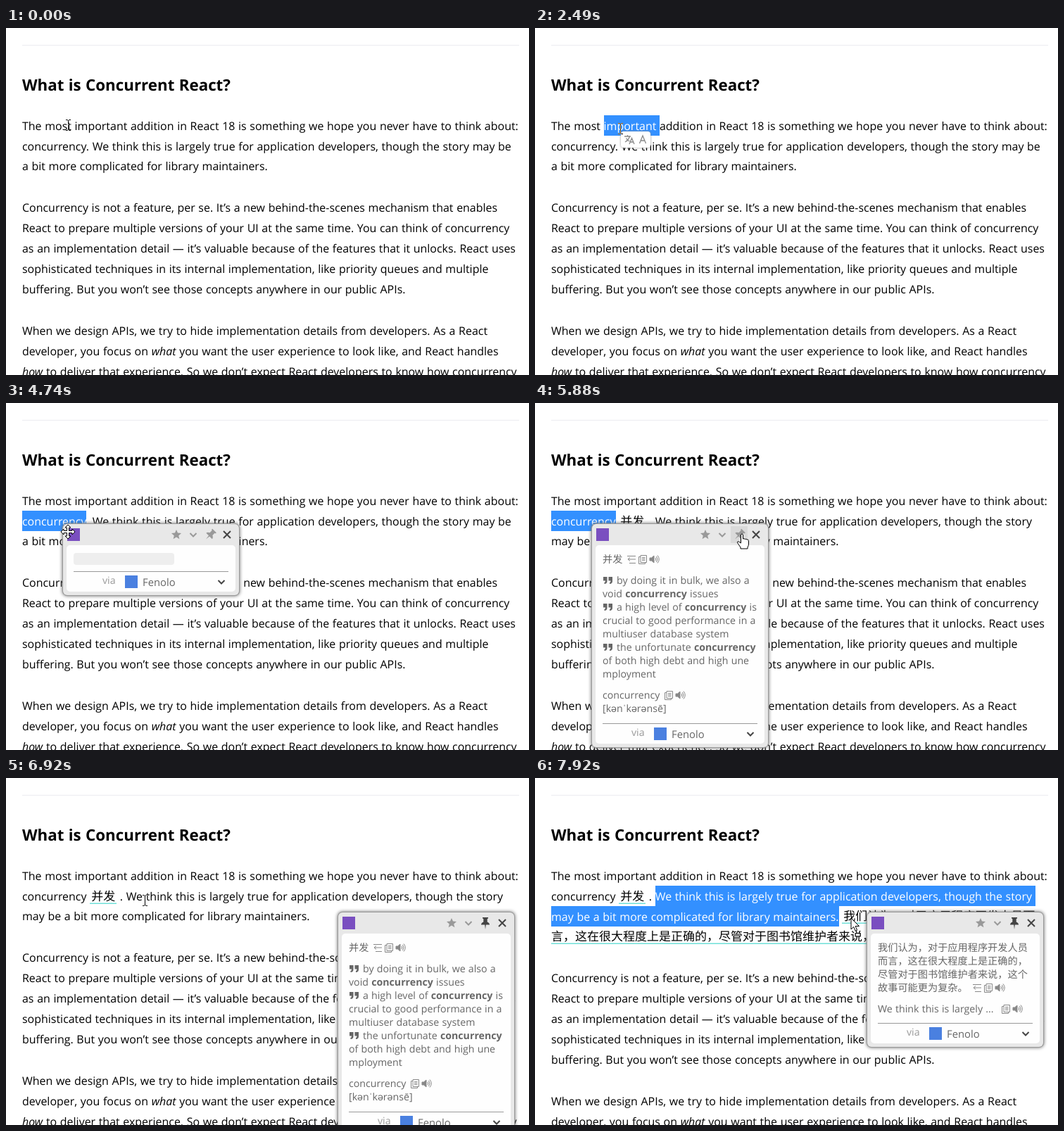
An HTML page that plays this animation: 743 by 493 pixels, repeating every 8 s.

```html
<!DOCTYPE html>
<html lang="en">
<head>
<meta charset="utf-8">
<title>Selection translator</title>
<style>
  html, body { margin: 0; width: 100%; height: 100%; overflow: hidden; background: #fff; }
  #stage {
    position: relative; width: 743px; height: 493px; overflow: hidden; isolation: isolate;
    background: #fff; color: #000; text-rendering: geometricPrecision;
    font: 15.96px/28.9px "Open Sans", "Noto Sans CJK SC", "Noto Sans CJK", sans-serif;
    word-spacing: .5px;
  }
  #stage > * { position: absolute; }
  hr { margin: 0; border: 0; height: 1px; }
  #rule { left: 23px; top: 24px; width: 706px; background: #ebecf0; }
  h2 { left: 23px; top: 66px; margin: 0; font-size: 22.35px; line-height: 30px; font-weight: 700; }
  #article { left: 23px; top: 124.65px; }
  p { margin: 0 0 29.95px; white-space: pre; }
  mark { background: #3390ff; color: #fff; padding: 3.65px 0 3.35px; }
  ins { text-decoration: none; font-size: 17px; line-height: 0; padding: 0 2px; box-shadow: inset 0 -1.6px #6fe0d8; }
  svg { fill: none; stroke: #888; overflow: visible; }
  .solid { fill: currentColor; stroke: none; }
  .filled { fill: #888; }

  #bar { width: 42px; height: 23px; border-radius: 4px; background: #fff; box-shadow: 0 0 3px #888; }
  #bar svg { position: absolute; top: 4px; stroke-width: 1.3; }

  #popup {
    width: 250px; box-sizing: border-box; padding: 30px 5px 5px; border-radius: 6px;
    background: #e8e8e8; box-shadow: 0 0 0 1px #999, 0 0 5px 1px #666;
    color: #666; font-size: 14.2px; line-height: 19.1px;
  }
  #popup .tool { position: absolute; top: 3px; width: 24px; height: 24px; display: grid; place-items: center; color: #999; }
  #popup .tool svg { stroke: currentColor; stroke-width: 2; }
  #popup .tool .solid { stroke: none; }
  .tool.hover { background: #dadada; }
  #popup .dark { color: #444; }
  .tilt { transform: rotate(45deg); }
  .badge { position: absolute; width: 18px; height: 18px; }
  .panel { padding: 10.5px 10px 0; border-radius: 5px; background: #fefefe; }
  .block { white-space: pre; margin-bottom: 11px; }
  .block svg { vertical-align: -2px; margin-right: 2px; }
  .block .solid { margin: 0 6px 0 1px; vertical-align: -1px; }
  .icons { margin-left: 6px; }
  .skeleton { width: 143px; height: 17px; margin-bottom: 10.5px; border-radius: 4px; background: #eee; }
  .panel hr { margin-top: -1px; background: #999; }
  .via { position: relative; height: 28px; line-height: 28px; }
  .via > * { position: absolute; }
  #cursor { left: 0; top: 0; }
</style>
</head>
<body>
<div id="stage">
  <hr id="rule">
  <h2>What is Concurrent React?</h2>
  <div id="article">
    <p id="intro"></p>
    <p>Concurrency is not a feature, per se. It’s a new behind-the-scenes mechanism that enables
React to prepare multiple versions of your UI at the same time. You can think of concurrency
as an implementation detail — it’s valuable because of the features that it unlocks. React uses
sophisticated techniques in its internal implementation, like priority queues and multiple
buffering. But you won’t see those concepts anywhere in our public APIs.</p>
    <p>When we design APIs, we try to hide implementation details from developers. As a React
developer, you focus on <em>what</em> you want the user experience to look like, and React handles
<em>how</em> to deliver that experience. So we don’t expect React developers to know how concurrency</p>
  </div>
  <div id="bar"></div>
  <div id="popup"></div>
  <svg id="cursor" width="743" height="493"><path/></svg>
</div>
<script>
const LOOP = 8000;
const $ = id => document.getElementById(id);
const icon = (d, cls = '', w = 14, h = 14) =>
  `<svg class="${cls}" width="${w}" height="${h}" viewBox="0 0 ${w} ${h}"><path d="${d}"/></svg>`;

const chevron = icon('M2.5 5L7 9.5L11.5 5');
const star = icon('M7 0L9 4.6L14 5L10.2 8.4L11.4 13.3L7 10.6L2.6 13.3L3.8 8.4L0 5L5 4.6Z', 'solid');
const cross = icon('M2 2L12 12M12 2L2 12');
const pin = cls => icon('M3 0H11V1.5L9.7 2V6.5Q13 8 13 10.5H1Q1 8 4.3 6.5V2L3 1.5ZM6.2 10.5H7.8L7 17Z', 'solid ' + cls, 14, 17);
const quote = icon('M0 1H5.5V7Q5.5 11 1.5 11V9Q3 9 3 6.5H0ZM7.5 1H13V7Q13 11 9 11V9Q10.5 9 10.5 6.5H7.5Z', 'solid', 13, 12);
const insert = icon('M1 2.5H13M2 7H13M4 12.5H13M5 4.5L2 7L5 9.5');
const copy = icon('M4 1.5H12.5V11.5H4ZM4 3.5H1.5V13.5H10.5V11.5M6 4.5H10.5M6 6.5H10.5M6 8.5H10.5');
const speaker = icon('M1 5H3.5L7 2V12L3.5 9H1Z', 'filled', 8) +
  icon('M1 5Q2.5 7 1 9M2.5 3Q5.5 7 2.5 11M4 1.5Q8.5 7 4 12.5', '', 7);
const icons = (...list) => `<span class="icons">${list.join('')}</span>`;

$('bar').innerHTML =
  icon('M0 3H9M4.5 1V3M7.5 3Q6 8 1 11M2.5 5.5Q4.5 9 7.5 10M7 14L10.5 5.5L14 14M8.3 11H12.7').replace('<svg', '<svg style="left:5px"') +
  icon('M0.5 13L5 2L9.5 13M2.2 9H7.8', '', 10).replace('<svg', '<svg style="left:26px"');

const cursors = {
  beam: 'M-3 -7.5H-1L.5 -6.5L2 -7.5H4M.5 -6.5V6.5M-3 7.5H-1L.5 6.5L2 7.5H4',
  arrow: 'M0 0V16L3.7 12.5L6.2 18.3L8.6 17.2L6.2 11.5H11.5Z',
  hand: 'M-1.5 1Q0 -1 1.5 1V7Q3 6 4.5 7.5Q6 6.7 7 8Q9 7.5 9.5 9.5V14Q9.5 17 8 19V21H-2V19L-6.5 12.5Q-7 10.5 -4.5 11L-1.5 13Z',
  move: 'M0 -10L4 -6H1.5V-1.5H6V-4L10 0L6 4V1.5H1.5V6H4L0 10L-4 6H-1.5V1.5H-6V4L-10 0L-6 -4V-1.5H-1.5V-6H-4Z'
};

const opening = 'The most important addition in React 18 is something we hope you never have to think about:\n';
const sentence = 'We think this is largely true for application developers, though the story \nmay be a bit more complicated for library maintainers.';
const plain = opening + 'concurrency. We think this is largely true for application developers, though the story may be\na bit more complicated for library maintainers.';
const withWord = opening + 'concurrency <ins>并发</ins> . ' + sentence;
const withSentence = withWord + ' <ins>我们认为，对于应用程序开发人员而\n言，这在很大程度上是正确的，尽管对于图书馆维护者来说，这个故事可能更为复杂。</ins>';
const upTo = word => sentence.slice(0, sentence.indexOf(word) + word.length);

const block = html => `<div class="block">${html}</div>`;
const contents = {
  wait: '<div class="skeleton"></div>',
  word: block('并发' + icons(insert, copy, speaker.replace('<svg', '<svg style="margin:0"'))) +
    block(`${quote}by doing it in bulk, we also a
void <b>concurrency</b> issues
${quote}a high level of <b>concurrency</b> is
crucial to good performance in a
multiuser database system
${quote}the unfortunate <b>concurrency</b>
of both high debt and high une
mployment`) +
    block('concurrency' + icons(copy, speaker.replace('<svg', '<svg style="margin:0"')) + '\n[kənˈkərənsē]'),
  sentence: block('我们认为，对于应用程序开发人员\n而言，这在很大程度上是正确的，\n尽管对于图书馆维护者来说，这个\n故事可能更为复杂。' +
      icons(insert, copy, speaker.replace('<svg', '<svg style="margin:0"'))) +
    block('We think this is largely ... ' + icons(copy, speaker.replace('<svg', '<svg style="margin:0"')))
};

const tool = (x, html, cls = '') => `<span class="tool ${cls}" style="left:${x - 12}px">${html}</span>`;
const popupHtml = ({ popup, pinned, hover }) => `
  <span class="badge" style="left:6px;top:6px;background:#7a4fc0"></span>
  ${tool(161, star)}${tool(185, chevron)}
  ${tool(209, pin(pinned ? '' : 'tilt'), (pinned ? 'dark ' : '') + (hover ? 'hover' : ''))}
  ${tool(233, cross, 'dark')}
  <div class="panel">${contents[popup]}<hr>
    <div class="via">
      <span style="left:41px;top:-1px;color:#999">via</span>
      <span class="badge" style="left:73px;top:5px;background:#4a80e0"></span>
      <span style="left:98px;top:1px;font-size:14.8px">Fenolo</span>
      <span class="tool dark" style="left:198px;top:2px">${chevron}</span>
    </div>
  </div>`;

// time, pointer shape, x, y, changes that persist
const steps = [
  [0, 'beam', 88, 138, { text: plain, selected: '', bar: false, popup: '', pinned: false, hover: false }],
  [400, 'beam', 84, 138],
  [550, 'beam', 79, 139],
  [670, 'beam', 75, 140],
  [930, 'beam', 75, 140, { selected: 'most ' }],
  [1050, 'beam', 75, 140, { bar: true }],
  [1830, 'beam', 75, 140, { bar: false }],
  [2080, 'beam', 93, 141],
  [2230, 'beam', 120, 143, { selected: '' }],
  [2490, 'beam', 121, 143, { selected: 'important ', bar: true }],
  [3250, 'beam', 120, 143, { bar: false }],
  [3380, 'beam', 118, 144],
  [3530, 'beam', 111, 149],
  [3680, 'beam', 98, 158],
  [3800, 'beam', 88, 164],
  [3930, 'beam', 80, 168, { selected: '' }],
  [4050, 'beam', 80, 168, { selected: 'concurrency' }],
  [4180, 'beam', 80, 168, { bar: true }],
  [4330, 'hand', 85, 177, { bar: [81, 172] }],
  [4450, 'hand', 88, 184],
  [4740, 'move', 88, 183, { bar: false, popup: 'wait' }],
  [4860, 'move', 88, 183, { popup: 'word', text: withWord }],
  [5260, 'move', 104, 185],
  [5380, 'move', 180, 187],
  [5500, 'hand', 263, 185],
  [5640, 'hand', 280, 187],
  [5760, 'hand', 292, 187, { hover: true }],
  [5880, 'hand', 294, 186],
  [6000, 'beam', 294, 187, { pinned: true, hover: false }],
  [6120, 'beam', 286, 186],
  [6240, 'beam', 260, 183],
  [6390, 'beam', 200, 170],
  [6510, 'beam', 169, 164],
  [6800, 'beam', 169, 164, { selected: '' }],
  [6920, 'beam', 197, 174],
  [7070, 'beam', 265, 176, { selected: upTo('this') }],
  [7190, 'beam', 350, 188, { selected: upTo('for lib') }],
  [7310, 'beam', 415, 196, { selected: upTo('maintaine') }],
  [7430, 'beam', 440, 199, { selected: sentence }],
  [7550, 'arrow', 452, 199],
  [7800, 'arrow', 450, 199, { popup: 'wait' }],
  [7920, 'arrow', 449, 199, { popup: 'sentence', text: withSentence }]
];
let last = {};
const states = steps.map(([start, shape, x, y, changes]) =>
  last = { ...last, ...changes, start, shape, x, y });

function place(el, x, y, visible) {
  el.style.left = x + 'px';
  el.style.top = y + 'px';
  el.style.display = visible ? '' : 'none';
}

function draw(s) {
  $('intro').innerHTML = s.selected ? s.text.replace(s.selected, '<mark>$&</mark>') : s.text;
  const [barX, barY] = s.bar === true ? [s.x + 1, s.y + 4] : s.bar || [0, 0];
  place($('bar'), barX, barY, s.bar);
  place($('popup'), s.pinned ? 472 : 81, s.pinned ? 191 : 172, s.popup);
  if (s.popup) $('popup').innerHTML = popupHtml(s);

  // The text pointer inverts whatever lies below it.
  const beam = s.shape === 'beam', cursor = $('cursor'), path = cursor.firstChild;
  cursor.style.mixBlendMode = beam ? 'difference' : 'normal';
  path.setAttribute('d', cursors[s.shape]);
  path.setAttribute('transform', `translate(${s.x} ${s.y})`);
  path.style.fill = beam ? 'none' : '#fff';
  path.style.stroke = beam ? '#fff' : '#000';
}

let shown;
function tick() {
  const t = performance.now() % LOOP;
  const state = states.filter(s => s.start <= t).pop();
  if (state !== shown) draw(shown = state);
  requestAnimationFrame(tick);
}
tick();
</script>
</body>
</html>
```
